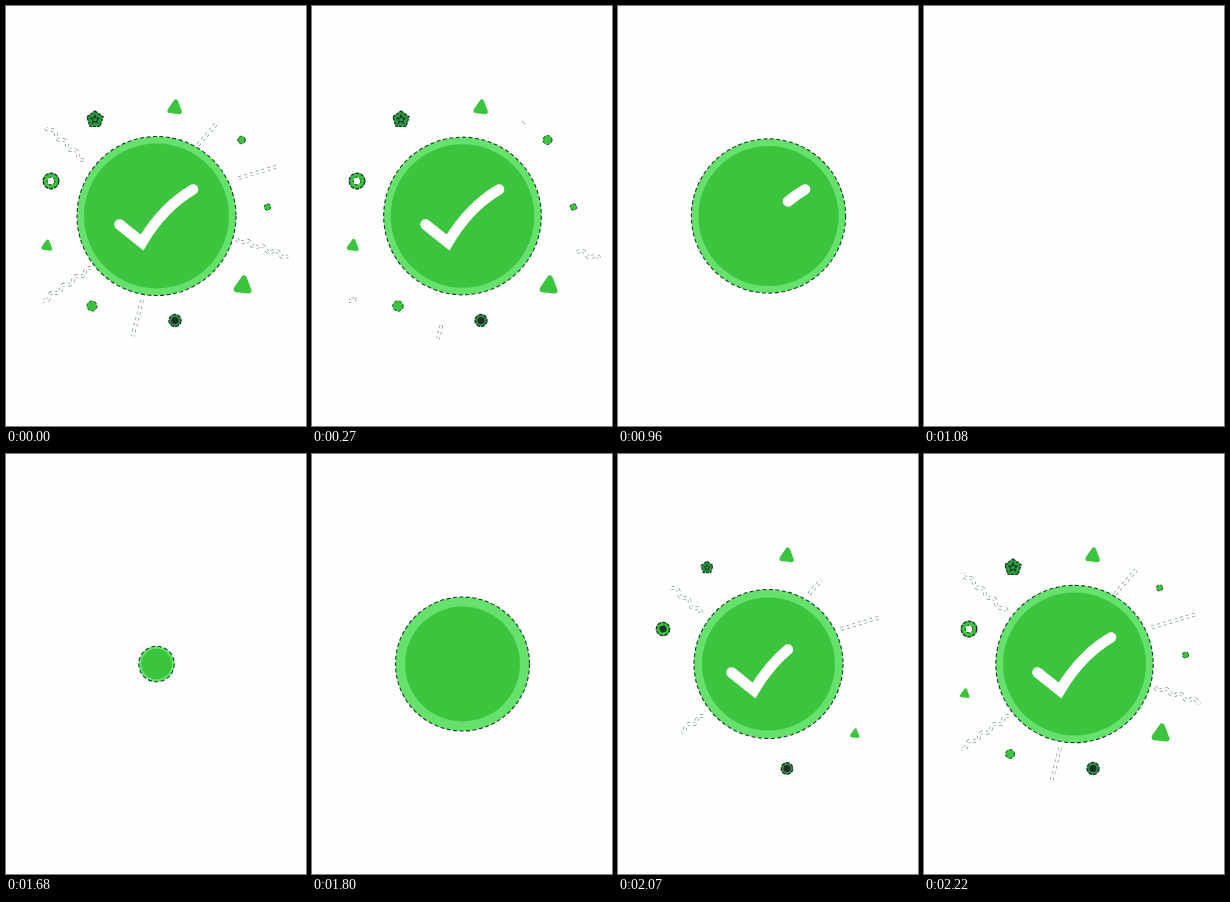
An HTML page with a canvas for the animation above (2250 ms loop, 300 px wide and 420 px high).

```html
<!DOCTYPE html>
<html lang="en">
<head>
<meta charset="utf-8">
<title>Success check</title>
<style>
html, body { margin: 0; width: 100%; height: 100%; overflow: hidden; background: #fefefe; }
canvas { display: block; width: 300px; height: 420px; }
</style>
</head>
<body>
<canvas id="stage" width="300" height="420"></canvas>
<script>
const ctx = document.getElementById('stage').getContext('2d');
const LOOP = 2250, ENTRY = 1680, VISIBLE = 1650, STEP = 30;
const GREEN = '#3cc43e', LIGHT = '#66e26c', DARK = '#123f24', PAPER = '#fefefe';

const CHECK = new Path2D('M113.5 218.5 L136 236.5 Q157 201 187 183.5');
const CHECK_LENGTH = 105;

const phase = (t, from, to) => Math.min(1, Math.max(0, (t - from) / (to - from)));
const easeOut = p => 1 - (1 - p) ** 2;
const smooth = p => p * p * (3 - 2 * p);

// Gives each item of a group its birth time.
const stagger = (first, step, items) =>
  items.map((item, i) => ({ ...item, birth: first + step * i }));

const piece = (shape, x, y, size) => ({ shape, x, y, size });
const ray = (x0, y0, x1, y1, wave = 0) => ({ x0, y0, x1, y1, wave });

const pieces = [
  ...stagger(200, 32, [
    piece('triangle', 169, 102, 8.5),
    piece('nut', 169, 314.5, 6.5),
    piece('ring', 45, 175, 8.5),
    piece('star', 89, 113.5, 8.5),
    piece('triangle', 237, 280, 10.5)
  ]),
  ...stagger(393, 18, [
    piece('dot', 261.5, 201, 3.8),
    piece('dot', 86, 300, 5.7),
    piece('triangle', 41, 240, 7),
    piece('dot', 235.5, 134, 5)
  ])
];

const rays = [
  ...stagger(260, 22, [
    ray(223, 175, 271, 160.5),
    ray(83, 159, 39, 119, 2),
    ray(191, 140, 212, 116),
    ray(85, 262, 37, 295, 2)
  ]),
  ...stagger(395, 15, [
    ray(136, 294, 126, 333),
    ray(231, 233, 288, 253, 2)
  ])
];

function disc(x, y, r, fill) {
  ctx.beginPath();
  ctx.arc(x, y, r, 0, 2 * Math.PI);
  ctx.fillStyle = fill;
  ctx.fill();
}

function polygon(points, radius, innerRadius = radius) {
  ctx.beginPath();
  for (let i = 0; i < points; i++) {
    const a = i / points * 2 * Math.PI - Math.PI / 2;
    const r = i % 2 ? innerRadius : radius;
    ctx.lineTo(r * Math.cos(a), r * Math.sin(a));
  }
  ctx.closePath();
}

function outline(width, dash, color = DARK) {
  ctx.setLineDash(dash);
  ctx.lineWidth = width;
  ctx.strokeStyle = color;
  ctx.stroke();
  ctx.setLineDash([]);
}

const shapes = {
  triangle(r) {
    ctx.rotate(.12);
    ctx.scale(.92, 1);
    polygon(3, r * .72);
    ctx.fillStyle = GREEN;
    ctx.fill();
    outline(r * .6, [], GREEN);
  },
  star(r) {
    polygon(5, r);
    ctx.fillStyle = '#2f9a42';
    ctx.fill();
    outline(1.4, [3, 1]);
    polygon(10, r * .7, r * .3);
    ctx.fillStyle = DARK;
    ctx.fill();
    disc(0, 0, r * .22, '#2f9a42');
  },
  dot(r) {
    disc(0, 0, r - .5, GREEN);
    outline(1, [3, 2]);
  },
  ring(r) {
    disc(0, 0, r - .7, GREEN);
    outline(1.4, [4, 1]);
    disc(0, 0, r * .45, r > 8 ? PAPER : DARK);
    outline(1, [3, 2]);
  },
  nut(r) {
    disc(0, 0, r - .5, '#2f8f4c');
    outline(1.4, [4, 1]);
    disc(0, 0, r * .55, '#252a25');
  }
};

function drawPiece({ shape, x, y, size, birth }, t) {
  const age = t - birth;
  const scale = easeOut(phase(age, 0, 200)) * (1 - phase(age, 650, 705) ** 4);
  if (scale < .15) return;
  ctx.save();
  ctx.translate(x, y);
  ctx.lineJoin = 'round';
  shapes[shape](size * scale);
  ctx.restore();
}

function drawRay({ x0, y0, x1, y1, wave, birth }, t) {
  const end = easeOut(phase(t - birth, 0, 240));
  const start = phase(t - birth, 250, 550);
  if (end <= start) return;
  const dx = x1 - x0, dy = y1 - y0, length = Math.hypot(dx, dy);
  ctx.beginPath();
  for (let i = 0; i <= 40; i++) {
    const p = start + (end - start) * i / 40;
    const offset = wave * Math.sin(p * 8 * Math.PI) / length;
    ctx.lineTo(x0 + dx * p - dy * offset, y0 + dy * p + dx * offset);
  }
  ctx.lineJoin = 'round';
  outline(3.6, [3, 3], '#6c8f79');
  outline(2.3, [], PAPER);
}

// The disc pops in, swells on, settles slowly and finally collapses.
function discRadius(t, pop, swell) {
  const open = pop * easeOut(phase(t, -20, 120)) + swell * phase(t, 120, 570);
  return (open - 2.4 * phase(t, 570, 1530)) * (1 - phase(t, 1530, VISIBLE) ** 2);
}

function drawCheck(t) {
  const start = CHECK_LENGTH * smooth(phase(t, 1320, 1620));
  const end = CHECK_LENGTH * easeOut(phase(t, 150, 600));
  if (end <= start || end === 0 || start > CHECK_LENGTH - 1) return;
  ctx.lineCap = 'round';
  ctx.lineJoin = 'miter';
  ctx.lineWidth = 10.6;
  ctx.strokeStyle = '#fff';
  ctx.setLineDash([end - start, 400]);
  ctx.lineDashOffset = -start;
  ctx.stroke(CHECK);
  ctx.setLineDash([]);
  ctx.lineDashOffset = 0;
  ctx.lineCap = 'butt';
}

function draw(t) {
  ctx.fillStyle = PAPER;
  ctx.fillRect(0, 0, 300, 420);
  if (t >= VISIBLE) return;
  rays.forEach(item => drawRay(item, t));
  pieces.forEach(item => drawPiece(item, t));
  disc(150.5, 210, discRadius(t, 67, 12.5), LIGHT);
  outline(1.1, [4, 2.5]);
  disc(150.5, 210, discRadius(t, 57.5, 15), GREEN);
  drawCheck(t);
}

const origin = performance.now();
function tick() {
  const now = Math.max(0, performance.now() - origin) % LOOP;
  const stepped = Math.floor(now / STEP) * STEP;
  draw((stepped + LOOP - ENTRY) % LOOP);
  requestAnimationFrame(tick);
}
tick();
</script>
</body>
</html>
```
